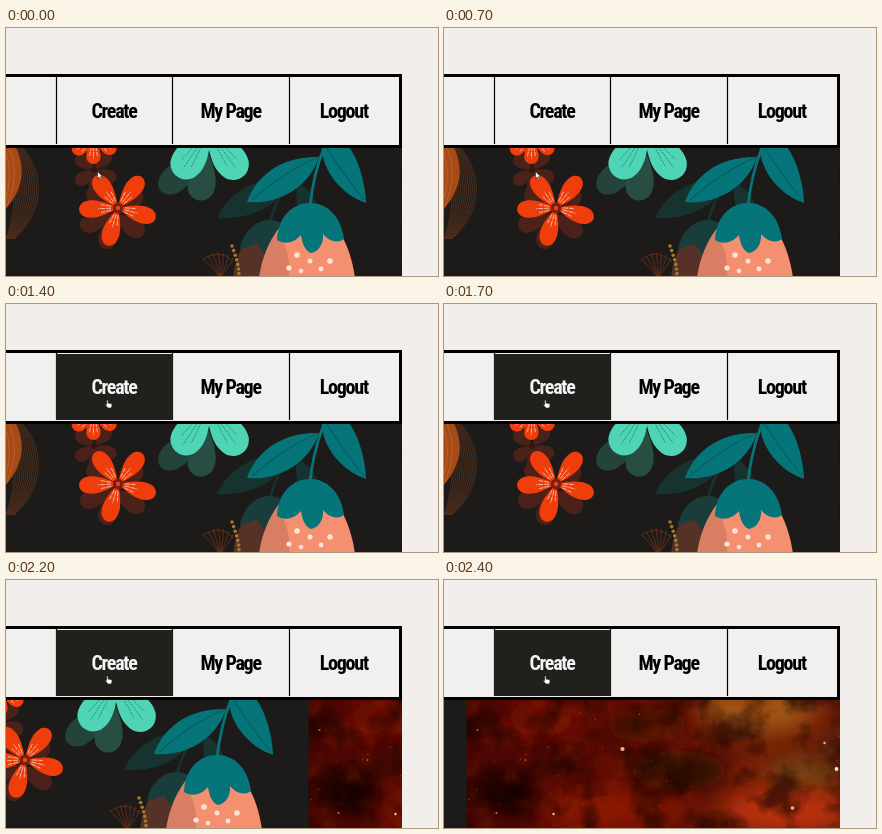
These frames come from a looping animation (432 px wide and 248 px high, 2.5 s). An HTML page:

```html
<!DOCTYPE html>
<html lang="en">
<head>
<meta charset="utf-8">
<title>Navigation hover and banner slide</title>
<style>
  html, body { margin: 0; width: 100%; height: 100%; overflow: hidden; background: #f2eeeb; }
  svg { display: block; width: 100vw; height: 100vh; }
  .label {
    font: 800 20px "Roboto Condensed", Roboto, "Open Sans", sans-serif;
    font-stretch: 75%; letter-spacing: -1.25px; text-anchor: middle;
  }
</style>
</head>
<body>
<svg viewBox="0 0 432 248">
  <defs>
    <clipPath id="banner"><rect y="119" width="396" height="129"/></clipPath>
    <clipPath id="nebulaBox"><rect y="119" width="396" height="129"/></clipPath>
    <filter id="blur" x="-100%" y="-120%" width="300%" height="340%"><feGaussianBlur stdDeviation="11"/></filter>
    <filter id="smoke" x="0" y="0" width="100%" height="100%" color-interpolation-filters="sRGB">
      <feTurbulence type="fractalNoise" baseFrequency=".03" numOctaves="5" seed="8"/>
      <feColorMatrix values="0 0 0 0 .08  0 0 0 0 .015  0 0 0 0 .01  3 0 0 0 -1.3"/>
    </filter>
    <filter id="glow" x="0" y="0" width="100%" height="100%" color-interpolation-filters="sRGB">
      <feTurbulence type="fractalNoise" baseFrequency=".035" numOctaves="5" seed="21"/>
      <feColorMatrix values="0 0 0 0 .66  0 0 0 0 .19  0 0 0 0 .04  0 3 0 0 -1.4"/>
    </filter>
    <linearGradient id="space">
      <stop stop-color="#460502"/><stop offset=".35" stop-color="#610c03"/>
      <stop offset=".7" stop-color="#6e1a06"/><stop offset="1" stop-color="#782409"/>
    </linearGradient>
  </defs>

  <g clip-path="url(#banner)">
    <g id="slides">
      <rect x="-5" y="119" width="405" height="129" fill="#1c1b19"/>
      <g id="garden"></g>
      <g id="nebula" transform="translate(395.5)" clip-path="url(#nebulaBox)"></g>
    </g>
  </g>

  <rect x="-10" y="47.5" width="404.5" height="71" fill="#f1f0ee" stroke="#000" stroke-width="3"/>
  <path d="M50.5 49V116M166.5 49V116M283.5 49V116" stroke="#000" stroke-width="1.2"/>
  <rect id="hover" x="50" y="50" width="117" height="66" fill="#21201d"/>
  <text id="create" class="label" x="108" y="89.8">Create</text>
  <text class="label" x="224.6" y="89.8">My Page</text>
  <text class="label" x="337.8" y="89.8">Logout</text>

  <g id="cursor" fill="#fff" stroke="#222" stroke-width=".6">
    <path id="arrow" d="M0 0V7L1.6 5.6L2.8 8.2L4 7.6L2.9 5.2H5Z"/>
    <path id="hand" d="M1.2 .4Q2.2 -.4 2.6 .6V3L6 3.8Q6.8 4.2 6.4 6L5.7 8H2.4L0 5Q0 4 1.2 4.5Z"/>
  </g>
</svg>

<script>
const $ = id => document.getElementById(id);
const TEAL = '#05757a', ORANGE = '#f03d0c', BROWN = '#4b2219';

const path = (d, fill, extra = '') => `<path d="${d}" fill="${fill}" ${extra}/>`;
const line = (d, color, width = 1, extra = '') =>
  path(d, 'none', `stroke="${color}" stroke-width="${width}" ${extra}`);
const dot = (x, y, r, fill) => `<circle cx="${x}" cy="${y}" r="${r}" fill="${fill}"/>`;
const oval = (x, y, rx, ry, fill, extra = '') =>
  `<ellipse cx="${x}" cy="${y}" rx="${rx}" ry="${ry}" fill="${fill}" ${extra}/>`;

// A round-tipped petal that grows from (x, y) in the given direction.
const petal = (x, y, angle, length, width, fill, streak = '') =>
  `<g transform="translate(${x} ${y}) rotate(${angle})">` +
  path(`M0 0C${length * .3} ${-width * .35} ${length * .6} ${-width * .65} ${length * .85} ${-width * .45}` +
       `C${length * 1.05} ${-width * .25} ${length * 1.05} ${width * .25} ${length * .85} ${width * .45}` +
       `C${length * .6} ${width * .65} ${length * .3} ${width * .35} 0 0Z`, fill) + streak + '</g>';

const flower = (x, y, angles, length, width, fill, streak) =>
  angles.map(a => petal(x, y, a, length, width, fill, streak)).join('');

function drawGarden() {
  const streaks = line('M7 0H20M7 -2L17 -4M7 2L17 4', '#f8cdb8', .8, 'stroke-dasharray="5 1"');
  const veins = line('M16 0H50M22 -3L44 -6M22 3L44 6', '#258d7b', .9, 'stroke-dasharray="2 1"');
  const arcs = Array.from({ length: 13 }, (_, i) =>
    line(`M${i * .7} 112C${11 + i * 2.5} 140 ${11 + i * 2.4} 183 ${i * .65} 211`, '#54301d', .9)).join('');
  const beads = Array.from({ length: 8 }, (_, i) =>
    dot(226 + 7 * Math.sin(i * .24), 218 + i * 4.6, 1.8, '#a6782c')).join('');
  const fan = Array.from({ length: 7 }, (_, i) =>
    line(`M214 250Q${204 + i * 3.5} 236 ${197 + i * 5} ${231 - 7 * Math.sin(i * .5)}`, '#70301a', .8)).join('');
  const seeds = [[291, 227, 2.8], [304, 233, 2.5], [283, 240, 2.6], [295, 243, 2.3],
    [324, 233, 2.8], [315, 241, 2.4]];

  $('garden').innerHTML =
    arcs + path('M-5 112H6C20 135 21 160 -5 186Z', '#a64b18') +
    line('M3 120Q15 145 1 178M-2 120Q9 145 -2 178', '#c2692d', .7) +

    flower(89, 142, [25, 88, 145, 215, 310], 23, 13, BROWN) +
    dot(88, 142, 3, '#35150f') +
    flower(88, 111, [30, 92, 148], 25, 14, ORANGE, streaks) +

    flower(108, 186, [35, 105, 158, 225, 320], 36, 18, BROWN) +
    flower(112, 180, [15, 106, 178, 234, 308], 39, 17, ORANGE, streaks) +
    dot(112, 180, 5.2, '#7b1d10') + dot(112, 180, 2.2, '#d74b20') +

    petal(203, 121, 139, 64, 26, '#23433b') + petal(201, 122, 99, 51, 27, '#284d43') +
    petal(205, 99, 124, 60, 32, '#4fd5b5', veins) + petal(200, 99, 54, 62, 32, '#4fd5b5', veins) +

    path('M287 151C252 148 223 163 211 190C246 192 271 178 287 151Z', '#17332f') +
    path('M291 154C315 168 316 190 310 211C293 196 288 176 291 154Z', '#17332f') +
    line('M286 151Q270 167 262 202', '#17332f', 2.5) +
    path('M227 250C230 222 244 199 263 199C281 201 287 225 287 250Z', '#563128') +
    path('M234 221C237 204 250 192 263 192C276 192 286 201 288 218L269 215L260 228L251 216Z', '#193d3b') +
    fan + line('M197 231Q214 220 228 234', '#70301a', .8) + beads +

    line('M323 108Q308 140 304 178', TEAL, 2.8) +
    path('M313 129C275 128 250 148 241 174C271 177 303 160 313 129Z', TEAL) +
    path('M316 108C345 100 359 147 360 175C334 166 312 140 316 108Z', TEAL) +
    line('M313 129Q280 142 246 172M320 119Q337 146 358 172', '#075b60', 1.1) +
    path('M253 250C258 214 279 183 304 183C329 184 345 219 349 250Z', '#f48f70') +
    path('M253 250C256 232 262 216 271 204Q285 222 283 250Z', '#6b3b30', 'opacity=".2"') +
    path('M271 212C272 188 287 175 304 175C321 175 335 188 338 211C331 216 323 213 317 206' +
         'C318 216 312 224 305 225C298 222 296 214 295 207C288 215 279 217 271 212Z', TEAL) +
    seeds.map(([x, y, r]) => dot(x, y, r, '#fde4d4')).join('');
}

function drawNebula() {
  const clouds = [
    [75, 138, 32, 18, '#780d03'], [42, 212, 32, 17, '#0f0101'], [145, 228, 70, 20, '#8a1703'],
    [180, 145, 42, 17, '#3d0a03'], [212, 190, 50, 19, '#2b0d05'], [290, 130, 58, 23, '#a05a15'],
    [335, 194, 38, 15, '#6b4a17'], [318, 230, 62, 22, '#bd3108'], [375, 165, 18, 22, '#4a1b0a']];
  const brightStars = [[156, 169, 2.1, '#ffb37c'], [370, 189, 1.9, '#ffe6d5'], [358, 163, 1.2, '#e9b692'],
    [326, 228, 1.8, '#ffb184'], [87, 234, 1.2, '#ffc7a3'], [11, 150, 1.1, '#d7532a'],
    [30, 233, 1.1, '#df6538'], [59, 180, .9, '#d7532a']];
  const random = n => { const v = Math.sin(n * 127.1) * 43758.5453; return v - Math.floor(v); };
  const dust = Array.from({ length: 45 }, (_, i) =>
    dot(random(i + 1) * 396, 120 + random(i + 101) * 128, .3 + random(i + 201) * .4, '#b8451f'));
  const veil = filter => `<rect y="119" width="396" height="129" filter="url(#${filter})"/>`;

  $('nebula').innerHTML =
    '<rect y="119" width="396" height="129" fill="url(#space)"/>' +
    clouds.map(c => oval(...c, 'filter="url(#blur)"')).join('') +
    `<g opacity=".25">${veil('glow')}</g><g opacity=".6">${veil('smoke')}</g>` +
    dust.join('') + brightStars.map(s => dot(...s)).join('');
}

const clamp = v => Math.min(1, Math.max(0, v));
const ease = v => v * v * (3 - 2 * v);
const SLIDE_STEPS = [93, 257, 373];

function render(now) {
  const time = Math.floor(now % 2500 / 100) * 100;
  const travel = ease(clamp((time - 1000) / 300));
  const shade = clamp((time - 1100) / 300);
  const slide = time < 2200 ? 0 : SLIDE_STEPS[(time - 2200) / 100];
  const overButton = time >= 1200;
  const ink = Math.round(244 * shade);

  $('slides').setAttribute('transform', `translate(${-slide})`);
  $('hover').setAttribute('opacity', shade);
  $('create').setAttribute('fill', `rgb(${ink},${ink},${ink})`);
  $('cursor').setAttribute('transform', `translate(${91.5 + 8 * travel} ${143.5 - 47.5 * travel})`);
  $('arrow').style.display = overButton ? 'none' : '';
  $('hand').style.display = overButton ? '' : 'none';
}

drawGarden();
drawNebula();
const start = performance.now();
(function tick() {
  render(performance.now() - start);
  requestAnimationFrame(tick);
})();
</script>
</body>
</html>
```
